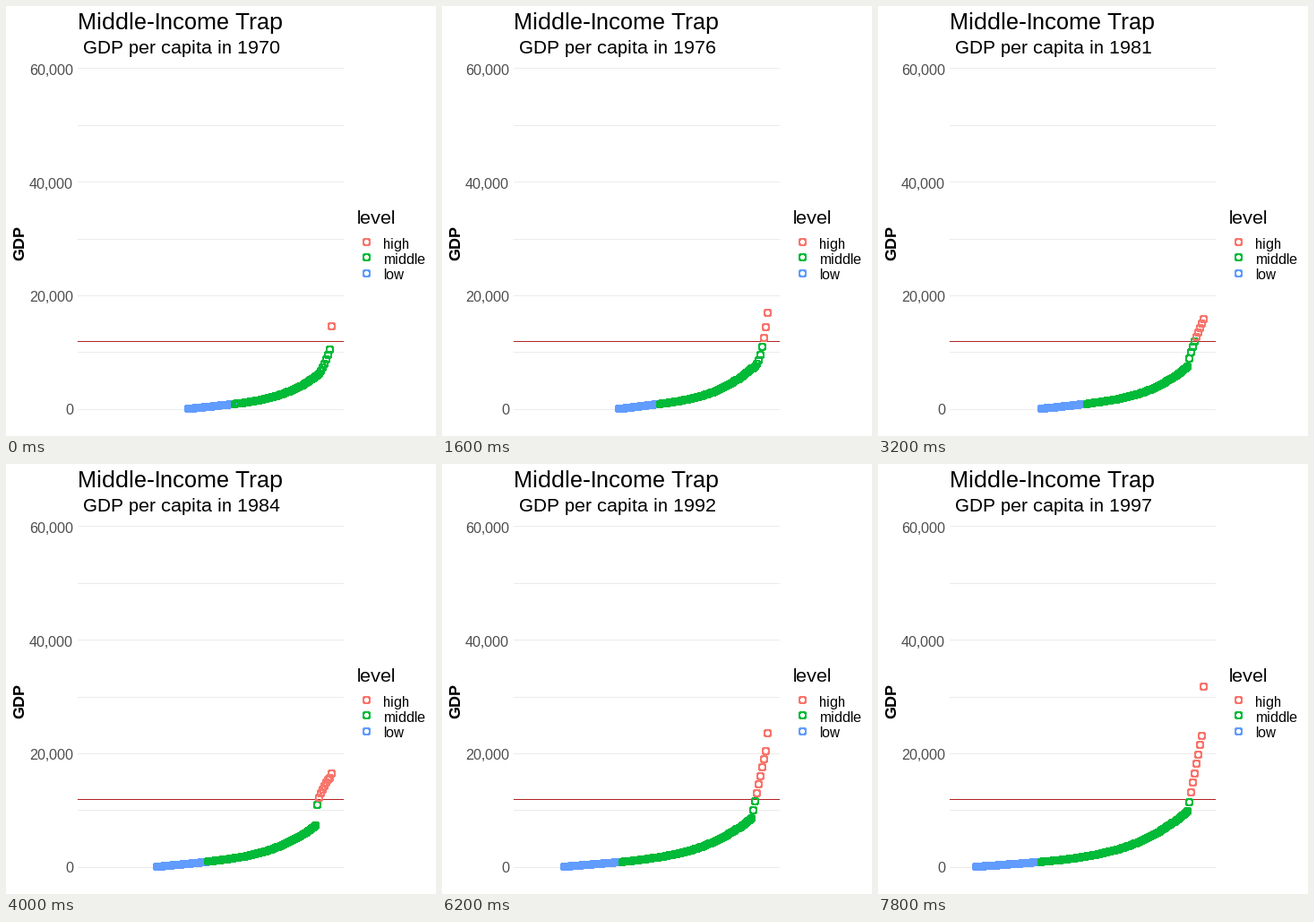
Animation of 480 by 480 pixels, one loop 8 s. Source, as a matplotlib script:

```python
import numpy as np
import matplotlib.pyplot as plt
from matplotlib.animation import FuncAnimation

SIZE, DPI = 480, 96
FRAMES, INTERVAL = 40, 200
PX = 72 / DPI                      # points per pixel
LEFT, WIDTH = 80, 297              # plot panel
ZERO_Y, RIGHT_X, STEP = 450.5, 363.5, 2.03
RICH = 9                           # countries on the steep top part
LOW_MAX, MIDDLE_MAX = 6.35, 75.8   # level limits, in pixels above zero
RED, GREEN, BLUE = "#F8766D", "#00BA38", "#619CFF"

# Shape of the curve at a few moments, interpolated in between
KEYS = [0, 8, 13, 20, 31, 39]
START = [203.5, 198, 192, 169, 136, 110.5]  # x of the poorest country
SLOPE = [14, 17, 17, 17, 17, 17]            # steady rise of the long tail
BEND = [22, 28, 31, 29, 37, 45]             # extra rise at its upper end
REACH = [36, 60, 50, 56, 85, 95]            # height of the top part
POWER = [1.6, 2.3, 1.1, 0.4, 1, 1]          # its curvature
LEAD = [20, 2, 0, 2, 10, 44]                # gap to the richest country

plt.rcParams.update({
    "font.family": ["Liberation Sans", "DejaVu Sans"],
    "text.hinting": "native",
    "text.hinting_factor": 1,
})


def curve(k):
    """Point positions and heights, poorest first."""
    start, slope, bend, reach, power, lead = (
        np.interp(k, KEYS, row)
        for row in (START, SLOPE, BEND, REACH, POWER, LEAD))
    count = int(round((RIGHT_X - start) / STEP)) + 1
    rank = np.arange(count)[::-1]
    x = RIGHT_X - STEP * rank
    u = np.clip((x - start) / (RIGHT_X - RICH * STEP - start), 0, 1)
    s = np.clip(1 - rank / RICH, 0, 1)
    h = 0.9 + slope * u + bend * u ** 4.3 + reach * s ** power
    h[-1] += lead
    return x, h


fig = plt.figure(figsize=(SIZE / DPI, SIZE / DPI), dpi=DPI, facecolor="white")
ax = fig.add_axes([0, 0, 1, 1])
ax.axis("off")


def label(x, y, s, px, color="black", **kw):
    return ax.text(x, y, s, fontsize=px * PX, color=color, va="baseline", **kw)


def rule(row, color):
    ax.barh(row, WIDTH, height=1, left=LEFT, align="edge", color=color,
            lw=0, zorder=1)


def centre(v):
    return np.floor(v) + 0.5


def rings(x, y, colors):
    return ax.scatter(x, y, s=(8 * PX) ** 2, facecolors="none",
                      edgecolors=colors, linewidths=PX, antialiased=False,
                      zorder=3)


for i in range(7):
    rule(round(69.4 + 63.4 * i), "#EBEBEB")
rule(374, "#B22222")

for i, name in enumerate(["60,000", "40,000", "20,000", "0"]):
    label(75, 77 + i * 126.5, name, 16, "#4D4D4D", ha="right")

label(79.5, 26, "Middle-Income Trap", 26)
subtitle = label(80, 53, "", 21)
label(20, 265, "GDP", 17.5, weight="bold", rotation=90, ha="center",
      rotation_mode="anchor")

label(392, 243, "level", 21)
for i, (name, color) in enumerate([("high", RED), ("middle", GREEN),
                                   ("low", BLUE)]):
    rings([402.5], [centre(263.4 + 17.3 * i)], [color])
    label(421.5, 271 + 17.2 * i, name, 16)

points = rings([], [], [])
ax.set_xlim(0, SIZE)
ax.set_ylim(SIZE, 0)


def draw(k):
    x, h = curve(k)
    points.set_offsets(np.column_stack([centre(x), centre(ZERO_Y - h)]))
    points.set_edgecolor([BLUE if v < LOW_MAX else GREEN if v < MIDDLE_MAX
                          else RED for v in h])
    subtitle.set_text(f" GDP per capita in {round(1970 + 0.7 * k)}")
    return points, subtitle


anim = FuncAnimation(fig, draw, frames=FRAMES, interval=INTERVAL,
                     repeat=True, repeat_delay=0, blit=False)
plt.show()
```
